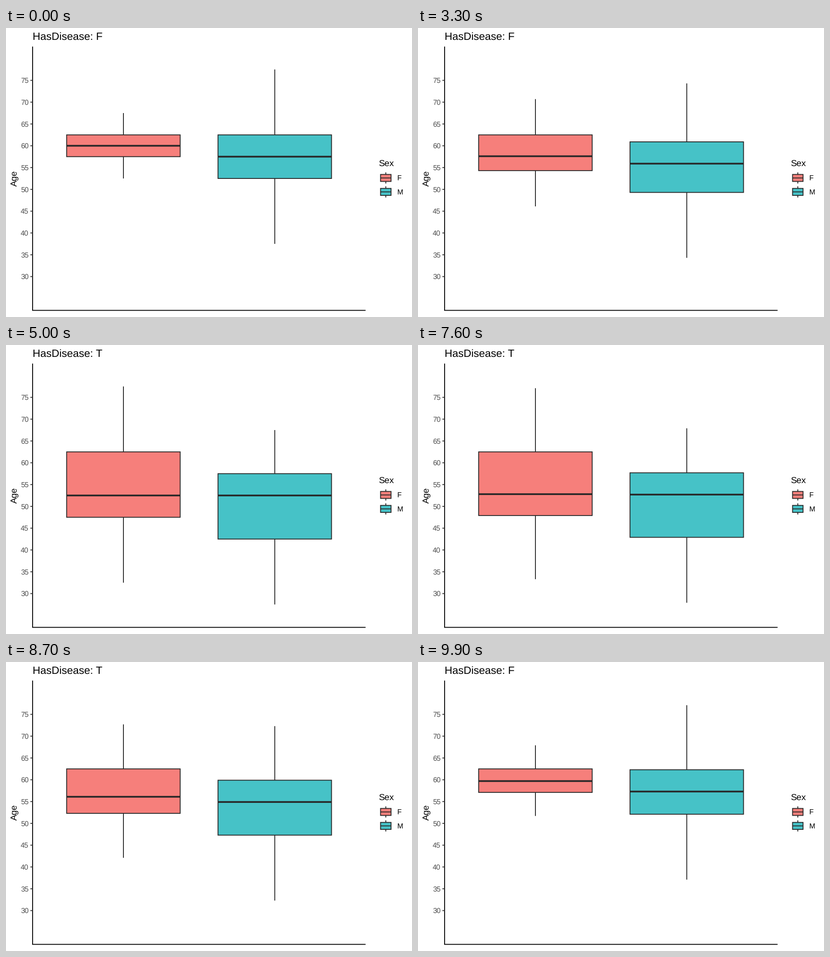
A matplotlib script that plays this animation: 885x632 px, repeating every 10000 ms.

```python
import numpy as np
import matplotlib.pyplot as plt
from matplotlib.animation import FuncAnimation
from matplotlib.patches import Rectangle

W, H, DPI = 885, 632, 64
LEFT, RIGHT, TOP, BOTTOM = 58, 783.8, 40.6, 617.5
PT = 1.765                # pixels per point of the theme
LINE = 1.88               # base line width in pixels
INK = "#282828"
FILLS = {"F": "#F67F7B", "M": "#46C2C7"}

# Whisker low, lower hinge, median, upper hinge, whisker high
STATES = {
    "F": {"F": np.array([52.5, 57.5, 60, 62.5, 67.5]),
          "M": np.array([37.5, 52.5, 57.5, 62.5, 77.5])},
    "T": {"F": np.array([32.5, 47.5, 52.5, 62.5, 77.5]),
          "M": np.array([27.5, 42.5, 52.5, 57.5, 67.5])},
}
FRAMES, INTERVAL = 100, 100
MOVE = 25                 # frames in each transition

plt.rcParams.update({
    "font.family": "Liberation Sans",
    "text.hinting": "none",
    "toolbar": "None",
})

fig = plt.figure(figsize=(W / DPI, H / DPI), dpi=DPI, facecolor="white")
ax = fig.add_axes([0, 0, 1, 1])
ax.set_xlim(0, W)
ax.set_ylim(H, 0)
ax.axis("off")


def px(size):
    return size * 72 / DPI


def age_y(age):
    return BOTTOM - (age - 22.25) * (BOTTOM - TOP) / 60.5


def line(xs, ys, color=INK, width=LINE):
    return ax.plot(xs, ys, color=color, lw=px(width), snap=False,
                   solid_capstyle="butt")[0]


def label(x, y, text, size, **kw):
    return ax.text(x, y, text, fontsize=px(size * PT), va="baseline", **kw)


class Box:
    """A box with whiskers, placed by five pixel heights."""

    def __init__(self, x, half, fill, median_width):
        self.rect = ax.add_patch(Rectangle(
            (x - half, 0), 2 * half, 0, facecolor=fill, edgecolor=INK,
            lw=px(LINE), snap=False, zorder=2))
        self.low = line([x, x], [0, 0])
        self.high = line([x, x], [0, 0])
        self.median = line([x - half, x + half], [0, 0], width=median_width)
        self.artists = [self.rect, self.low, self.high, self.median]

    def place(self, ys):
        low, q1, mid, q3, high = ys
        self.rect.set_y(q3)
        self.rect.set_height(q1 - q3)
        self.low.set_ydata([q1, low])
        self.high.set_ydata([q3, high])
        self.median.set_ydata([mid, mid])


# Axes
line([LEFT, LEFT], [TOP, BOTTOM], "black")
line([LEFT - LINE / 2, RIGHT], [BOTTOM, BOTTOM], "black")
for age in range(30, 80, 5):
    y = age_y(age)
    line([LEFT - 4.85, LEFT], [y, y], "#333333")
    label(49.3, y + 5.5, str(age), 8.8, ha="right", color="#4D4D4D")
ax.text(23.6, (TOP + BOTTOM) / 2, "Age", fontsize=px(11 * PT), rotation=90,
        rotation_mode="anchor", ha="center", va="baseline")
title = label(LEFT, 26, "", 13.2)

# Legend
label(812.6, 301.6, "Sex", 11)
key = 17.28 * PT
for i, (sex, fill) in enumerate(FILLS.items()):
    y = 327.9 + i * key
    Box(827.9, 0.375 * key, fill, LINE).place(
        y + key * np.array([0.4, 0.25, 0, -0.25, -0.4]))
    label(852.6, y + 5.5, sex, 8.8)

# Data boxes
unit = (RIGHT - LEFT) / 2.2
boxes = {sex: Box(LEFT + unit * (0.6 + i), 0.375 * unit, fill, 2 * LINE)
         for i, (sex, fill) in enumerate(FILLS.items())}


def update(n):
    p = np.clip((n - 25) / MOVE, 0, 1) - np.clip((n - 75) / MOVE, 0, 1)
    title.set_text("HasDisease: " + ("T" if p > 0.5 else "F"))
    for sex, box in boxes.items():
        start, end = STATES["F"][sex], STATES["T"][sex]
        box.place(age_y(start + (end - start) * p))
    return [title] + [a for box in boxes.values() for a in box.artists]


anim = FuncAnimation(fig, update, frames=FRAMES, interval=INTERVAL,
                     init_func=lambda: update(0), repeat=True,
                     repeat_delay=0, blit=False)
plt.show()
```
